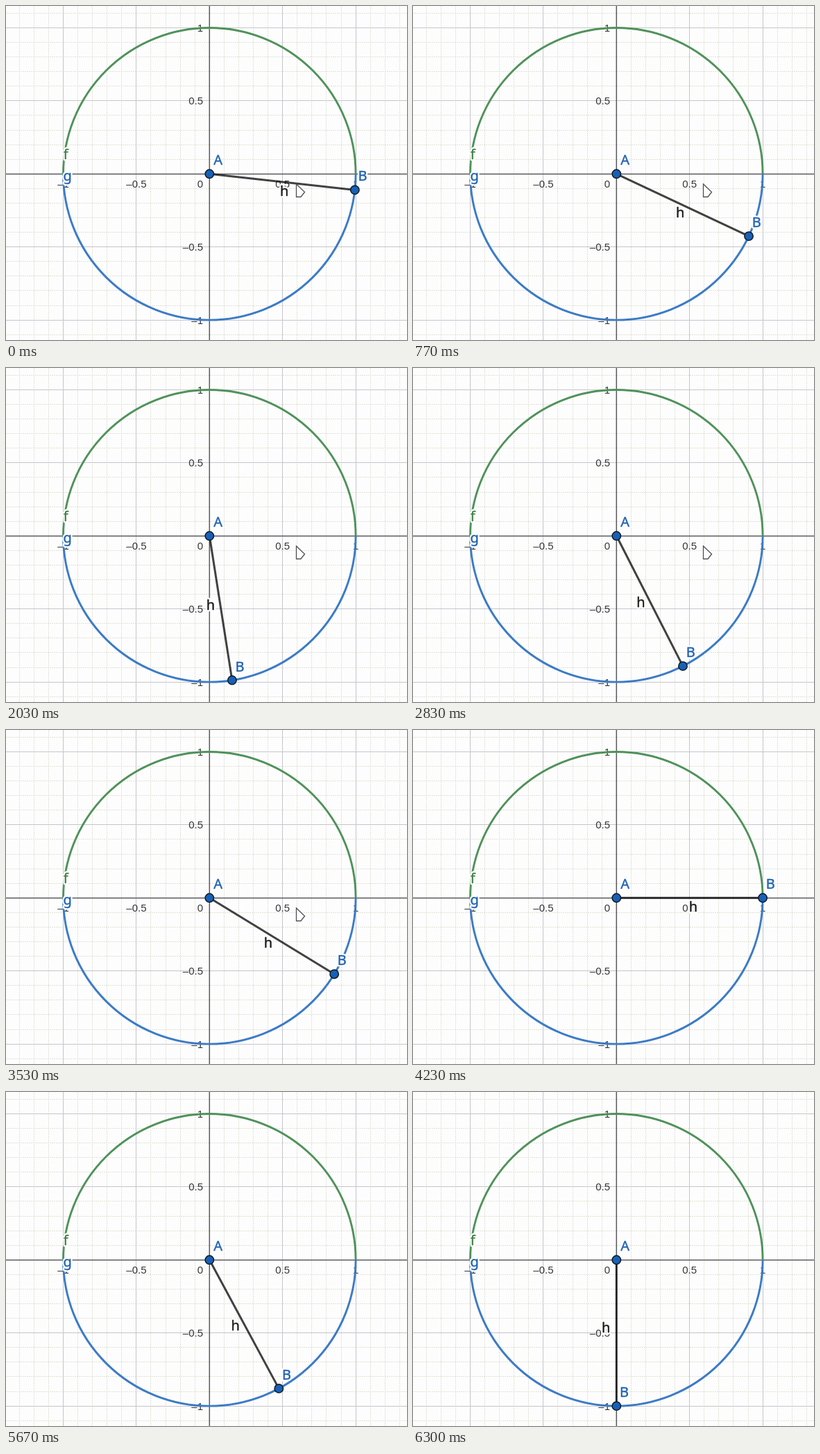
An HTML page with a canvas for the animation above (6.33 s loop, 578 px wide and 482 px high).

```html
<!DOCTYPE html>
<html lang="en">
<head>
<meta charset="utf-8">
<title>Radius on a unit circle</title>
<style>
  html, body { margin: 0; width: 100%; height: 100%; overflow: hidden; background: #fdfdfd; }
  canvas { display: block; }
</style>
</head>
<body>
<canvas id="stage" width="578" height="482"></canvas>
<script>
const W = 578, H = 482, LOOP = 6330, FRAME = 100 / 3;
const CX = 293.3, CY = 242.3, UNIT = 210.8;
const PAPER = '#fdfdfd', INK = '#1c1c1c', AXIS = '#5a5a5e';
const BLUE = '#2063b2', GREEN = '#3c7f40';
const ctx = document.getElementById('stage').getContext('2d');

// [time in ms, degrees below the x axis]
const swing = [[0, 6.3], [140, 0], [195, 0], [2235, 90], [4230, 0], [4287, 0], [6300, 90], [LOOP, 90]];
const CURSOR_GONE = 4000;

function angleAt(t) {
  const i = Math.max(1, swing.findIndex(([time]) => time >= t));
  const [t0, a0] = swing[i - 1], [t1, a1] = swing[i];
  return (a0 + (a1 - a0) * (t - t0) / (t1 - t0)) * Math.PI / 180;
}

function line(x1, y1, x2, y2, color, width, dash = []) {
  ctx.strokeStyle = color;
  ctx.lineWidth = width;
  ctx.setLineDash(dash);
  ctx.beginPath();
  ctx.moveTo(x1, y1);
  ctx.lineTo(x2, y2);
  ctx.stroke();
  ctx.setLineDash([]);
}

function gridLine(n, color, dash) {
  const x = Math.floor(CX + n * UNIT / 10) + 0.5;
  const y = Math.floor(CY + n * UNIT / 10) + 0.5;
  line(x, 0, x, H, color, 1, dash);
  line(0, y, W, y, color, 1, dash);
}

function drawGrid() {
  for (let n = -14; n <= 14; n++) if (n % 5) gridLine(n, '#e2e2d8', [2, 1]);
  for (let n = -10; n <= 10; n += 5) if (n) gridLine(n, '#c6c6cc');
  line(CX, 0, CX, H, AXIS, 1.5);
  line(0, CY + 0.2, W, CY + 0.2, AXIS, 1.5);
}

function drawNumbers() {
  ctx.font = '15px "Liberation Sans", Arial, sans-serif';
  ctx.fillStyle = '#363638';
  for (const v of [-1, -0.5, 0.5, 1]) {
    const text = String(v).replace('-', '\u2013');
    ctx.textAlign = 'center';
    ctx.fillText(text, CX + v * UNIT, 262);
    ctx.textAlign = 'right';
    ctx.fillText(text, 284, Math.round(CY - v * UNIT + 5.4));
  }
  ctx.fillText('0', 284, 262);
}

function label(text, x, y, color) {
  ctx.font = '20px "Noto Sans", "Open Sans", sans-serif';
  ctx.textAlign = 'left';
  ctx.lineJoin = 'round';
  ctx.lineWidth = 5;
  ctx.strokeStyle = PAPER;
  ctx.strokeText(text, x, y);
  ctx.fillStyle = ctx.strokeStyle = color;
  ctx.lineWidth = 0.4;
  ctx.strokeText(text, x, y);
  ctx.fillText(text, x, y);
}

function arc(from, to, color) {
  ctx.strokeStyle = color;
  ctx.lineWidth = 2.9;
  ctx.beginPath();
  ctx.arc(CX, CY, UNIT, from, to);
  ctx.stroke();
}

function point(x, y) {
  ctx.beginPath();
  ctx.arc(x, y, 6.2, 0, 2 * Math.PI);
  ctx.fillStyle = '#1661b8';
  ctx.fill();
  ctx.lineWidth = 1.5;
  ctx.strokeStyle = '#101820';
  ctx.stroke();
}

function drawCursor() {
  ctx.beginPath();
  for (const [x, y] of [[418.5, 257], [430.5, 268.5], [425, 275.5], [418.5, 275.5]]) ctx.lineTo(x, y);
  ctx.closePath();
  ctx.fillStyle = PAPER;
  ctx.fill();
  ctx.lineJoin = 'miter';
  ctx.lineWidth = 1.3;
  ctx.strokeStyle = '#505054';
  ctx.stroke();
}

function draw(t) {
  const a = angleAt(t), cos = Math.cos(a), sin = Math.sin(a);
  const bx = CX + UNIT * cos, by = CY + UNIT * sin;
  ctx.fillStyle = PAPER;
  ctx.fillRect(0, 0, W, H);
  drawGrid();
  drawNumbers();
  arc(Math.PI, 2 * Math.PI, '#4f925a');
  arc(0, Math.PI, '#3c7bc6');
  line(CX, CY, bx, by, 'rgba(0, 0, 0, 0.74)', 3);
  label('f', 82.8, 221, GREEN);
  label('g', 82.5, 252, BLUE);
  // the segment's name stays at a fixed distance from its middle
  label('h', (CX + bx) / 2 - 20.3 * sin - 0.9, (CY + by) / 2 + 20.3 * cos - 0.3, INK);
  label('A', CX + 6, CY - 13, BLUE);
  label('B', bx + 4.7, by - 13, BLUE);
  point(CX, CY);
  point(bx, by);
  if (t < CURSOR_GONE) drawCursor();
}

const start = performance.now();
function tick() {
  const t = (performance.now() - start) % LOOP;
  draw(Math.min(LOOP, Math.floor((t + 5) / FRAME) * FRAME));
  requestAnimationFrame(tick);
}
tick();
</script>
</body>
</html>
```
